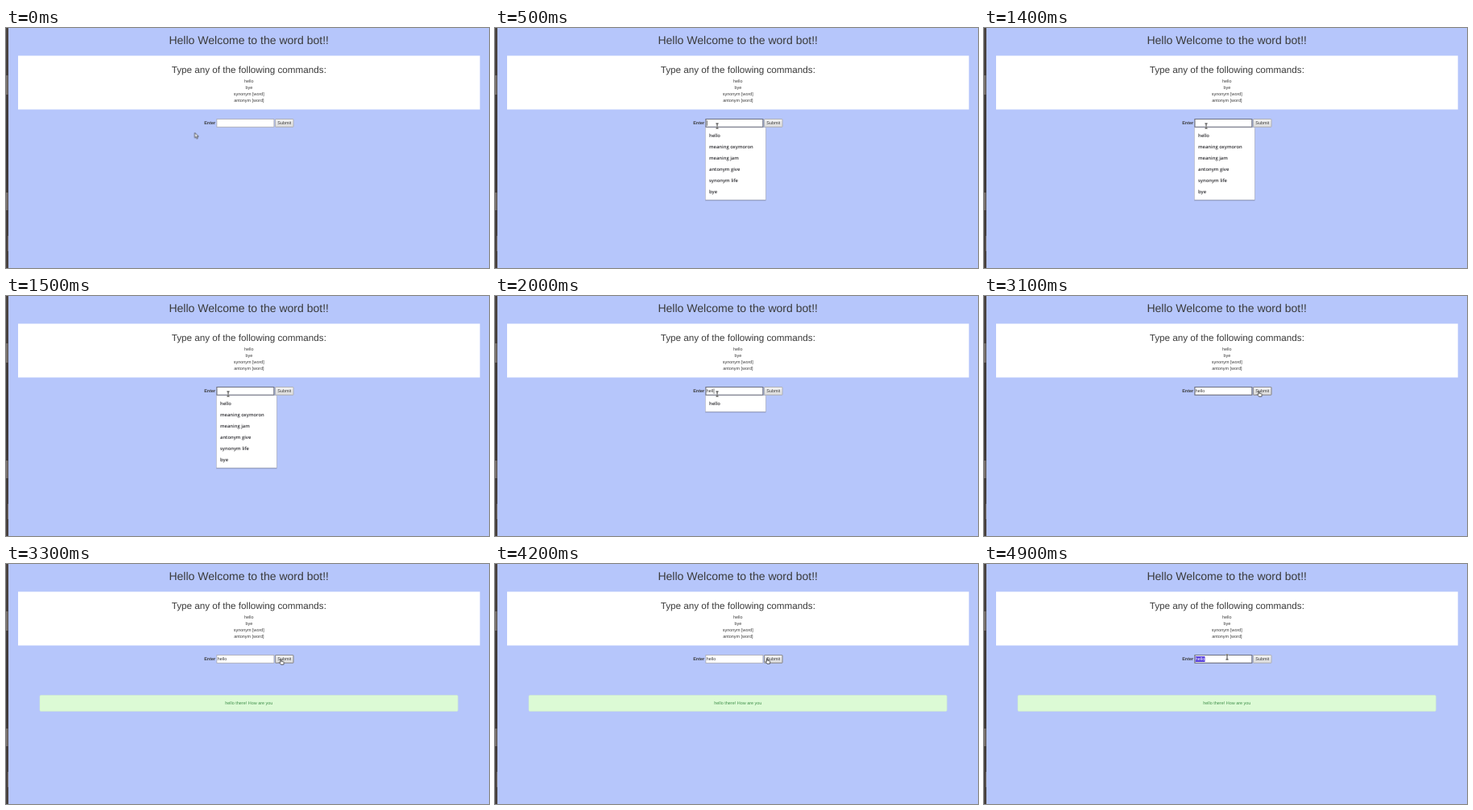
Animation, 600 px wide and 299 px high, one loop 5000 ms. Source, as an HTML page:

```html
<!DOCTYPE html>
<html lang="en">
<head>
<meta charset="utf-8">
<title>Word bot</title>
<style>
  html, body { margin: 0; width: 100%; height: 100%; overflow: hidden; background: #b6c6fb; }
  svg { display: block; width: 100vw; height: 100vh; }
  text { font: 5.46px "Liberation Sans", Arial, sans-serif; fill: #3a3a3a; text-rendering: geometricPrecision; }
  .mid { text-anchor: middle; }
  .title { font-size: 14.04px; }
  .heading { font-size: 11.7px; }
  .label { font-weight: bold; }
  .menu text { font: 600 5.85px "Open Sans", "Noto Sans", sans-serif; fill: #2c2c30; }
  .reply text { fill: #3f8f4a; }

  /* Every part runs on the same 5 s clock; 2% = 100 ms */
  .a { animation: 5s step-end infinite; }
  .focus { animation-name: focus; }
  .full { animation-name: full; }
  .short { animation-name: short; }
  .reply { animation-name: reply; }
  .selection { animation-name: selection; }
  .hover { animation-name: hover; }
  .caret { animation-name: caret; }
  .pointer { animation-name: move; }
  .arrow { animation-name: arrow; }
  .beam { animation-name: beam; }
  .hand { animation-name: hand; }
  .h { animation-name: typeH; }
  .e { animation-name: typeE; }
  .l1 { animation-name: typeL1; }
  .l2 { animation-name: typeL2; }
  .o { animation-name: typeO; }

  @keyframes focus { 0%, 64% { opacity: 0 } 8%, 92% { opacity: 1 } }
  @keyframes full { 0%, 32% { opacity: 0 } 8% { opacity: 1 } }
  @keyframes short { 0%, 44% { opacity: 0 } 32% { opacity: 1 } }
  @keyframes reply { 0% { opacity: 0 } 64% { opacity: 1 } }
  @keyframes selection { 0% { opacity: 0 } 96% { opacity: 1 } }
  @keyframes hover { 0%, 86% { opacity: 0 } 60% { opacity: 1 } }
  @keyframes typeH { 0% { opacity: 0 } 32% { opacity: 1 } }
  @keyframes typeE { 0% { opacity: 0 } 34% { opacity: 1 } }
  @keyframes typeL1 { 0% { opacity: 0 } 36% { opacity: 1 } }
  @keyframes typeL2 { 0% { opacity: 0 } 38% { opacity: 1 } }
  @keyframes typeO { 0% { opacity: 0 } 42% { opacity: 1 } }
  @keyframes caret {
    0%, 20%, 54% { opacity: 0; transform: none }
    8% { opacity: 1; transform: none }
    32% { opacity: 1; transform: translateX(3px) }
    34% { opacity: 1; transform: translateX(6.1px) }
    36% { opacity: 1; transform: translateX(7.3px) }
    38% { opacity: 1; transform: translateX(8.5px) }
    42% { opacity: 1; transform: translateX(11.5px) }
  }
  @keyframes arrow { 0% { opacity: 1 } 6% { opacity: 0 } }
  @keyframes beam { 0%, 60% { opacity: 0 } 6%, 86% { opacity: 1 } }
  @keyframes hand { 0%, 86% { opacity: 0 } 60% { opacity: 1 } }
  @keyframes move {
    0% { transform: translate(234.5px, 130.5px) }
    2% { transform: translate(240px, 129.5px) }
    4% { transform: translate(254px, 126px) }
    6% { transform: translate(270px, 122.5px) }
    8%, 50% { transform: translate(276px, 122px) }
    52% { transform: translate(280px, 122px) }
    54% { transform: translate(294px, 121px) }
    56% { transform: translate(312px, 120.5px) }
    58% { transform: translate(328px, 120.5px) }
    60% { transform: translate(338px, 121px) }
    62%, 82% { transform: translate(342.5px, 122px) }
    84% { transform: translate(339px, 121px) }
    86% { transform: translate(329px, 119px) }
    88% { transform: translate(316px, 117px) }
    90% { transform: translate(306px, 116.5px) }
    92%, 100% { transform: translate(302px, 116px) }
  }
</style>
</head>
<body>
<svg viewBox="0 0 600 299" preserveAspectRatio="none">
  <defs>
    <linearGradient id="button" x2="0" y2="1">
      <stop stop-color="#f3f3f3"/><stop offset="1" stop-color="#dcdcdc"/>
    </linearGradient>
    <linearGradient id="dock" x2="0" y2="1">
      <stop stop-color="#4b4542"/><stop offset=".5" stop-color="#3c3737"/><stop offset="1" stop-color="#4a4340"/>
    </linearGradient>
    <filter id="shadow" x="-10%" y="-10%" width="120%" height="125%">
      <feDropShadow dx="0" dy=".6" stdDeviation=".7" flood-color="#333" flood-opacity=".5"/>
    </filter>
  </defs>

  <rect width="600" height="299" fill="#b6c6fb"/>
  <rect width="3" height="299" fill="url(#dock)"/>
  <path d="M0 59h2.5v24H0zM0 205h2.5v22H0z" fill="#77706d"/>
  <path d="M2.5 259v19" stroke="#77706d"/>

  <text class="mid title" x="301.7" y="20">Hello Welcome to the word bot!!</text>
  <rect x="15" y="34.5" width="573.7" height="67" fill="#fff"/>
  <text class="mid heading" x="301.8" y="56.4">Type any of the following commands:</text>
  <text class="mid" x="301.8" y="68.4">hello</text>
  <text class="mid" x="301.8" y="76.2">bye</text>
  <text class="mid" x="301.8" y="84">synonym [word]</text>
  <text class="mid" x="301.8" y="91.8">antonym [word]</text>

  <g class="a reply">
    <rect x="42" y="163.4" width="519.3" height="20" rx="1.5" fill="#dcfad5" stroke="#d3edc9" stroke-width=".5"/>
    <text class="mid" x="301.8" y="175.3">hello there! How are you</text>
  </g>

  <text class="label" x="246.2" y="120.3">Enter</text>
  <rect x="261.9" y="113.5" width="71" height="9.8" fill="#fff" stroke="#a9a9b0" stroke-width=".8"/>
  <rect class="a focus" x="261.9" y="113.5" width="71" height="9.8" fill="none" stroke="#6c7080"/>
  <text x="262.9" y="120.3"><tspan> </tspan></text>
  <g id="typed"></g>
  <g class="a selection">
    <rect x="262.6" y="115" width="11.9" height="7" fill="#5840dc"/>
    <text x="262.8" y="120.3" style="fill:#fff">hello</text>
  </g>
  <path class="a caret" d="M263.5 115.2v6.6" stroke="#333" stroke-width=".6"/>

  <rect x="334.6" y="113.5" width="22.4" height="9.8" rx=".5" fill="url(#button)" stroke="#a6a6a8" stroke-width=".8"/>
  <rect class="a hover" x="334.6" y="113.5" width="22.4" height="9.8" rx=".5" fill="none" stroke="#85858c" stroke-width=".8"/>
  <text class="mid" x="345.8" y="120.3">Submit</text>

  <g class="a menu full">
    <rect x="261.5" y="124" width="74.7" height="90" fill="#fff" stroke="#b4b4bc" stroke-width=".4" filter="url(#shadow)"/>
    <text x="266" y="136">hello</text>
    <text x="266" y="150">meaning oxymoron</text>
    <text x="266" y="164">meaning jam</text>
    <text x="266" y="178">antonym give</text>
    <text x="266" y="192">synonym life</text>
    <text x="266" y="206">bye</text>
  </g>
  <g class="a menu short">
    <rect x="261.5" y="124" width="74.7" height="20" fill="#fff" stroke="#b4b4bc" stroke-width=".4" filter="url(#shadow)"/>
    <text x="266" y="136">hello</text>
  </g>

  <g class="a pointer">
    <path class="a arrow" d="M0 0v6.3l1.5-1.3 1 2.4 1.2-.5-1-2.3h2z" fill="#fff" stroke="#222" stroke-width=".7"/>
    <g class="a beam" fill="none">
      <path d="M-1.7-3h3.4M-1.7 3h3.4M0-3v6" stroke="#fff" stroke-width="1.8"/>
      <path d="M-1.6-3h3.2M-1.6 3h3.2M0-3v6" stroke="#222" stroke-width=".9"/>
    </g>
    <path class="a hand" d="M-1.5-3.2q.7-.6 1.2.2v2.3l2.6.6q.7.3.5 1.2l-.5 2.2h-3.3l-2-2.7q.2-1 1.5 0z" fill="#fff" stroke="#222" stroke-width=".7"/>
  </g>
</svg>
<script>
  // One element per letter so each can appear at its own moment
  const advance = { h: .556, e: .556, l1: .222, l2: .222, o: .556 };
  let x = 262.8;
  for (const [name, width] of Object.entries(advance)) {
    const letter = document.createElementNS(document.querySelector("svg").namespaceURI, "text");
    letter.setAttribute("class", "a " + name);
    letter.setAttribute("x", x);
    letter.setAttribute("y", 120.3);
    letter.textContent = name[0];
    document.getElementById("typed").append(letter);
    x += width * 5.46;
  }
</script>
</body>
</html>
```
